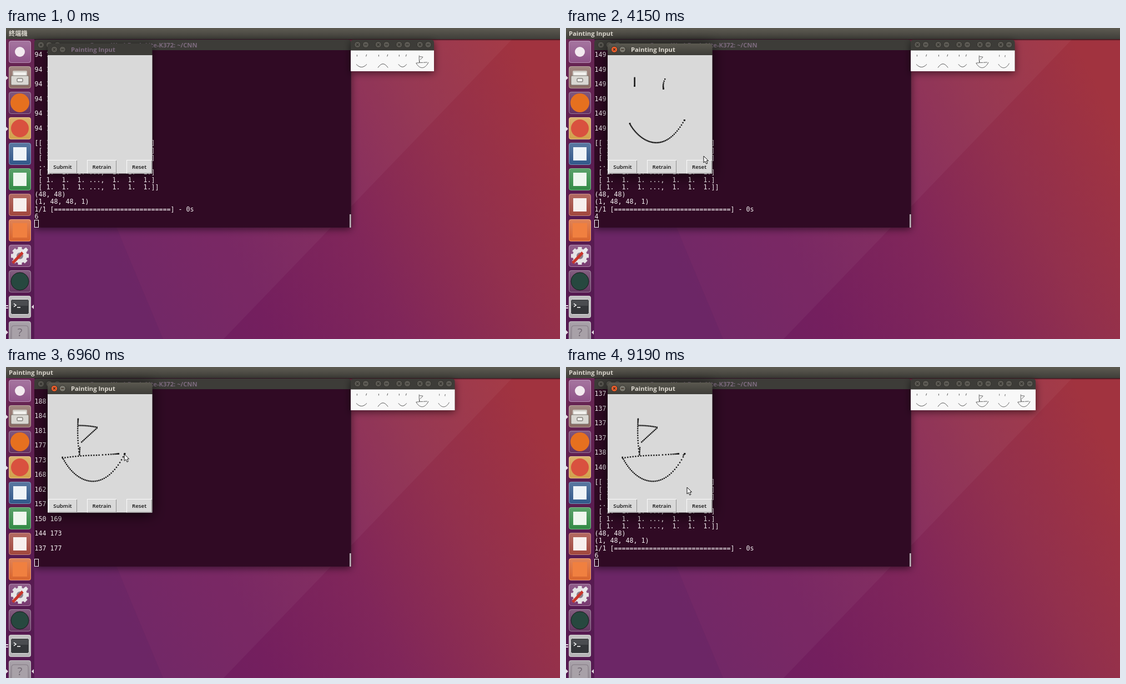
Animation of 998x561 px, one loop 9210 ms. Source, as an HTML page with a canvas:

```html
<!DOCTYPE html>
<html>
<head>
<meta charset="utf-8">
<title>Painting Input</title>
<style>
html, body { margin: 0; width: 100%; height: 100%; overflow: hidden; background: #6c2062; }
canvas { display: block; }
</style>
</head>
<body>
<canvas id="stage" width="998" height="561"></canvas>
<script>
const g = document.getElementById('stage').getContext('2d');
const LOOP = 9210, UNIT = 0.785, PRINT_LAG = 50, CLEAR_AT = 4420;
const UI = '"Open Sans", "Noto Sans", "Noto Sans CJK TC", "Noto Sans CJK", sans-serif';
const TITLE = 'bold 11.2px ' + UI;
const MONO = '11.63px "DejaVu Sans Mono", monospace';
const DIM = '#7d6b7e', LIT = '#dfdbd2';

// ---------- pen strokes: Bezier curves sampled like a mouse ----------
const mix = (a, b, u) => a + (b - a) * u;
function bezier(points, u) {
  while (points.length > 1)
    points = points.slice(1).map((p, i) => [mix(points[i][0], p[0], u), mix(points[i][1], p[1], u)]);
  return points[0];
}
const linear = u => u;
const easeIn = u => u ** 1.5;
const easeOut = u => 1 - (1 - u) ** 2.09;

const strokes = [];
function stroke(drawing, start, gap, n, curve, { ease = linear, hold = 0 } = {}) {
  const samples = [];
  for (let i = 0; i <= n + hold; i++) {
    const [x, y] = bezier(curve, ease(Math.min(1, i / n)));
    samples.push({ t: start + gap * i, x, y });
  }
  strokes.push({ drawing, samples });
}
const SMILE = 0, BOAT = 1;
stroke(SMILE, 890, 12, 10, [[62, 52], [62, 71]], { hold: 2 });
stroke(SMILE, 1300, 10, 9, [[131.5, 55.07], [126, 66.035], [128, 77]], { ease: easeOut, hold: 3 });
stroke(SMILE, 1890, 1, 1, [[51, 157], [51, 157]]);
stroke(SMILE, 1930, 6.5, 44, [[51, 158], [72, 196], [128, 236], [176, 149.5]], { hold: 6 });

stroke(BOAT, 4640, 17, 17, [[70, 57], [67, 100], [73, 139]], { ease: easeIn });
stroke(BOAT, 4960, 17, 4, [[73, 139], [74, 123]]);
stroke(BOAT, 5220, 16, 11, [[72, 72], [93, 72], [113, 76]]);
stroke(BOAT, 5420, 16, 12, [[113, 78], [78, 110]]);
stroke(BOAT, 5802, 18, 13, [[34.2, 146.7], [73.2, 140.87], [112.2, 140.3]]);
stroke(BOAT, 6080, 15, 11, [[118, 140], [163, 137]], { ease: easeOut });
stroke(BOAT, 6420, 12, 40, [[34, 145], [62, 203], [128, 236], [177, 137]], { hold: 3 });
stroke(BOAT, 6950, 12, 1, [[176, 138], [174, 140]]);

// ---------- terminal log ----------
const matrixRow = (head, tail) => head + ' 1.  1.  1. ...,  1.  1.  1.' + tail;
const result = digit => [matrixRow('[[', ']'), matrixRow(' [', ']'), matrixRow(' [', ']'), ' ..., ',
  matrixRow(' [', ']'), matrixRow(' [', ']'), matrixRow(' [', ']]'),
  '(48, 48)', '(1, 48, 48, 1)', '1/1 [' + '='.repeat(30) + '] - 0s', digit];
const log = [];
const print = (t, lines) => lines.forEach(text => log.push({ t, text }));
for (let i = 0; i < 6; i++) print(-1, ['94 176', '']);
print(-1, result('6'));
for (const s of strokes.flatMap(s => s.samples))
  print(s.t + PRINT_LAG, [Math.floor(s.y) + ' ' + Math.floor(s.x), '']);
print(2900, result('4'));
print(7440, result('6'));
log.sort((a, b) => a.t - b.t);

// ---------- pointer: rests at a few places, follows the pen in between ----------
const path = [];
const rest = (from, to, x, y) => path.push({ t: from, x, y }, { t: to, x, y });
rest(3060, 3560, 169, 195);
rest(4150, 4190, 248, 231);
rest(4310, 4430, 240, 247);
rest(7280, 7600, 105, 249);
rest(7880, 8300, 165, 200);
rest(8870, 8910, 190, 181);
rest(9190, LOOP, 218, 217);
for (const s of strokes) if (s.drawing === BOAT)
  for (const p of s.samples) path.push({ t: p.t, x: 75 + p.x * UNIT, y: 49 + p.y * UNIT });
path.sort((a, b) => a.t - b.t);

function pointerAt(t) {
  if (t < path[0].t) return null;
  const i = path.findIndex(p => p.t > t), a = path[i - 1], b = path[i];
  const drawing = b.t - a.t < 20;
  const u = drawing ? 0 : (t - a.t) / (b.t - a.t), s = u * u * (3 - 2 * u);
  return { x: mix(a.x, b.x, s), y: mix(a.y, b.y, s) };
}

const within = (t, a, b) => t >= a && t < b;
function focusAt(t) {
  if (t < 880) return 'terminal';
  if (within(t, 2940, 3340) || within(t, 7480, 8120)) return 'viewer';
  if (within(t, 3340, 3500) || within(t, 8120, 8260)) return 'dialog';
  return 'paint';
}
const panelText = { terminal: '終端機', viewer: 'Canvaloomer: tmptqn3_f75', dialog: 'Iguess...', paint: 'Painting Input' };

// ---------- drawing helpers ----------
function rect(x, y, w, h, fill) { g.fillStyle = fill; g.fillRect(x, y, w, h); }
function round(x, y, w, h, r, fill, line) {
  g.beginPath(); g.roundRect(x, y, w, h, r);
  g.fillStyle = fill; g.fill();
  if (line) { g.strokeStyle = line; g.lineWidth = 1; g.stroke(); }
}
function disc(x, y, r, fill, line) {
  g.beginPath(); g.arc(x, y, r, 0, 7);
  g.fillStyle = fill; g.fill();
  if (line) { g.strokeStyle = line; g.lineWidth = 1; g.stroke(); }
}
function trace(points) { g.beginPath(); points.forEach(p => g.lineTo(...p)); }
function line(points, color, width) { trace(points); g.strokeStyle = color; g.lineWidth = width; g.stroke(); }
function shape(points, color) { trace(points); g.closePath(); g.fillStyle = color; g.fill(); }
function text(str, x, y, color, font, align = 'left') {
  g.font = font; g.fillStyle = color; g.textAlign = align;
  g.fillText(str, x, y);
}
function gradient(x0, y0, x1, y1, ...colors) {
  const grad = g.createLinearGradient(x0, y0, x1, y1);
  colors.forEach((c, i) => grad.addColorStop(i / (colors.length - 1), c));
  return grad;
}
function frameWindow(x, y, w, h, bar, focused) {
  g.save();
  g.shadowColor = `rgba(0,0,0,${focused ? 0.75 : 0.55})`;
  g.shadowBlur = focused ? 24 : 14;
  g.shadowOffsetY = 3;
  round(x, y, w, h, [5, 5, 0, 0], '#3d3c38');
  g.restore();
  if (focused) round(x, y, w, bar, [5, 5, 0, 0], gradient(0, y, 0, y + bar, '#5b5950', '#3d3c37'));
}
function windowButtons(x, y, kinds, focused) {
  kinds.forEach((kind, i) => {
    const close = kind === 'close', cx = x + 14.8 * i;
    const ink = focused ? '#3a2a20' : '#35342f';
    disc(cx, y, 5.6, !focused ? '#5c5a54' : close ? '#ee5f2c' : '#7c7a70', '#33322d');
    if (close) {
      line([[cx - 2, y - 2], [cx + 2, y + 2]], ink, 1.2);
      line([[cx + 2, y - 2], [cx - 2, y + 2]], ink, 1.2);
    } else if (kind === 'min') line([[cx - 2.5, y], [cx + 2.5, y]], ink, 1.3);
    else { g.strokeStyle = ink; g.lineWidth = 1; g.strokeRect(cx - 2, y - 2, 4, 4); }
  });
}

// ---------- desktop ----------
function desktop() {
  rect(0, 0, 998, 561, gradient(250, 561, 998, 180, '#6b1f61', '#741f5e', '#80265a', '#92304d', '#a1333f'));
  shape([[50, 20], [912, 20], [392, 561], [50, 561]], 'rgba(255,255,255,.04)');
  shape([[50, 350], [195, 350], [283, 561], [50, 561]], 'rgba(60,25,90,.1)');
}
function panel(focus) {
  rect(0, 20, 998, 3, gradient(0, 20, 0, 23, 'rgba(20,10,16,.8)', 'rgba(20,10,16,0)'));
  rect(0, 0, 998, 20, gradient(0, 0, 0, 20, '#5d5b52', '#3f3e39'));
  text(panelText[focus], 5, 13.5, LIT, TITLE);
}

const plainDisc = (r, color, edge) => y => disc(25, y, r, color, edge);
const plainSquare = (size, color) => y => rect(25 - size / 2, y - size / 2, size, size, color);
function drawer(y) {
  round(12, y - 12, 26, 11, 2, '#cfccc6');
  rect(14, y - 9, 22, 6, '#f2f1ee');
  round(9, y - 3, 32, 17, 2, '#d9d7d2', '#77706a');
  round(20, y + 2, 10, 6, 1, '#efeeec', '#56524d');
}
function gear(y) {
  for (let i = 0; i < 4; i++) {
    const c = Math.cos(i * Math.PI / 4) * 16, s = Math.sin(i * Math.PI / 4) * 16;
    line([[25 - c, y - s], [25 + c, y + s]], '#e6e4e6', 7);
  }
  disc(25, y, 13, '#e6e4e6');
  disc(25, y, 6, '#8d7f8c');
  line([[12, y + 13], [32, y - 8]], '#c8352b', 5);
  line([[30, y - 6], [38, y - 13]], '#eceaec', 6);
}
function shell(y) {
  round(8.5, y - 13.5, 33, 27, 3, '#34363a', '#e6e6e6');
  rect(10, y - 12, 30, 10, '#4a4c50');
  line([[14, y - 6], [18, y - 3], [14, y]], '#fff', 1.5);
  line([[20, y + 1], [26, y + 1]], '#fff', 1.5);
}
function unknown(y) {
  round(10, y - 12, 30, 30, 4, '#a8a1a8', '#837a84');
  text('?', 25, y + 7, '#716873', '20px ' + UI, 'center');
}
const launchers = [
  ['#8f5388', plainDisc(9, '#f3eaf0')], ['#8b6a62', drawer],
  ['#63305f', plainDisc(17, '#e6701f')], ['#d2a04b', plainDisc(16, '#d9513f')],
  ['#31588a', plainSquare(24, '#eef3f7')], ['#328a45', plainSquare(24, '#eef6ee')],
  ['#a1463c', plainSquare(24, '#f7efed')], ['#d9652d', plainSquare(26, '#f08040')],
  ['#77386f', gear], ['#643660', plainDisc(16, '#27483f', '#161c1c')],
  ['#b4b2b4', shell], ['#958d96', unknown]
];
function arrow(x, y, dir) { shape([[x, y - 4], [x + 4 * dir, y], [x, y + 4]], '#e8dfe6'); }
function launcher(focus) {
  rect(0, 20, 51, 541, gradient(0, 20, 0, 561, '#692653', '#591b50', '#551a52'));
  launchers.forEach(([color, icon], i) => {
    const top = 23 + 46 * i;
    round(5, top, 40, 40, 4, color);
    round(5.5, top + 0.5, 39, 39, 4,
      gradient(0, top, 0, top + 40, 'rgba(255,255,255,.2)', 'rgba(255,255,255,0)'), 'rgba(255,255,255,.35)');
    icon(top + 20);
  });
  [90, 182, 549].forEach(y => arrow(0, y, 1));
  rect(0, 500, 4, 2, '#e8dfe6');
  rect(0, 504, 4, 2, '#e8dfe6');
  if (focus !== 'viewer') arrow(50, focus === 'terminal' ? 503 : 549, -1);
}

function terminal(t) {
  frameWindow(51, 21, 570.5, 339, 19, false);
  windowButtons(63, 30.5, ['close', 'min', 'max'], false);
  text('nora@nora-WorkBook-Lite-K372: ~/CNN', 344.5, 34.5, DIM, TITLE, 'right');
  rect(51, 40, 570.5, 320, '#300a24');
  const rows = log.filter(l => l.t <= t).slice(-23);
  rows.forEach((l, i) => text(l.text, 51.5, 52.3 + 13.25 * i, '#f4f0f2', MONO));
  g.strokeStyle = '#fff'; g.lineWidth = 1;
  g.strokeRect(51.5, 346.5, 7, 13);
  rect(619, 336, 2.5, 24, '#c2bcbf');
}

// ---------- thumbnails ----------
const TILE = 37.5, THUMB = TILE / 241;
const STEPS = Array.from({ length: 9 }, (_, i) => i / 8);
function face(left, right, corner, bend) {
  const mouth = [[left, corner], [(left + right) / 2, bend], [right, corner]];
  return [[[left + 9, 50], [left + 9, 70]], [[right - 2, 46], [right - 9, 70]], STEPS.map(u => bezier(mouth, u))];
}
const sketch = n => strokes.filter(s => s.drawing === n).map(s => s.samples.map(p => [p.x, p.y]));
const thumbs = [face(64, 186, 160, 226), face(74, 190, 200, 112), face(70, 165, 160, 222),
  sketch(BOAT), sketch(SMILE), sketch(BOAT)];
function viewers(t, focus) {
  const count = t < 2940 ? 4 : t < 7480 ? 5 : 6;
  const newest = focus === 'viewer' ? count - 1 : -1;
  const quiet = newest < 0 ? count : newest;
  frameWindow(621, 21, TILE * quiet, 57, 19.5, false);
  if (newest > 0) frameWindow(621 + TILE * newest, 20, TILE, 58, 20.5, true);
  rect(621, 40.5, TILE * count, 37.5, '#f8f8f8');
  thumbs.slice(0, count).forEach((lines, i) => {
    const x = 621 + TILE * i;
    windowButtons(x + 12.2, 30, ['close', 'min'], i === newest);
    for (const points of lines)
      line(points.map(p => [x + p[0] * THUMB, 40.5 + p[1] * THUMB]), '#444', 0.9);
  });
}

// ---------- painting window ----------
function button(label, x, w, hover, pressed) {
  rect(x, 238, w, 24.5, pressed ? '#8a8a8a' : '#fafafa');
  rect(x + 1, 239, w - 1, 23.5, pressed ? '#fafafa' : '#8f8f8f');
  rect(x + 1, 239, w - 2, 22.5, hover ? '#ececec' : '#d9d9d9');
  text(label, x + w / 2, 254, '#111', '600 9.7px ' + UI, 'center');
}
function paintWindow(t, focus, pointer) {
  const lit = focus === 'paint';
  frameWindow(75, 28, 188.5, 234.5, 21, lit);
  windowButtons(87, 38.7, ['close', 'min'], lit);
  text('Painting Input', 117, 43, lit ? LIT : DIM, TITLE);
  rect(75, 49, 188.5, 213.5, '#d9d9d9');
  const over = (x, w) => lit && pointer && within(pointer.y, 238, 262) && within(pointer.x, x, x + w);
  button('Submit', 76, 52, within(t, 2550, 2900) || over(76, 52), within(t, 2700, 2900) || within(t, 7330, 7440));
  button('Retrain', 146, 53, over(146, 53), false);
  button('Reset', 217, 46, over(217, 46), within(t, 4330, CLEAR_AT));
  const current = t < CLEAR_AT ? SMILE : BOAT;
  for (const s of strokes) if (s.drawing === current)
    for (const p of s.samples) if (p.t <= t)
      rect(75 + p.x * UNIT - 1.2, 49 + p.y * UNIT - 1.2, 2.4, 2.4, '#1c1c1c');
}

function dialog(t, focus) {
  const first = within(t, 3020, 3500);
  if (!first && !within(t, 7600, 8260)) return;
  const x = first ? 115 : 117, w = first ? 108 : 104, lit = focus === 'dialog';
  frameWindow(x, 119, w, 95, 21, lit);
  windowButtons(x + 12, 130, ['close', 'max'], lit);
  text('Iguess...', x + 43, 134, lit ? LIT : '#806f83', TITLE);
  rect(x, 140, w, 74.5, '#d9d9d9');
  const bulb = x + 20;
  disc(bulb, 156, 7.5, gradient(bulb - 7, 149, bulb + 7, 163, '#eef7ff', '#8fbfe6'), '#6f9cc4');
  rect(bulb - 3, 163, 6, 6, '#c9a95a');
  rect(bulb - 2, 169, 4, 2, '#4a4a4a');
  text(first ? "It's smile?" : "It's boat?", x + 46.5, 160, '#111', 'bold 10.9px ' + UI);
  const ok = first ? 140 : 139;
  rect(ok, 185, 58, 23.5, '#8f8f8f');
  rect(ok, 185, 57, 22.5, '#f8f8f8');
  text('OK', ok + 28.5, 200.5, '#111', '600 9.7px ' + UI, 'center');
  rect(ok + 22, 202, 7, 1, '#111');
}

function arrowPointer({ x, y }) {
  g.save();
  g.translate(x, y);
  shape([[0, 0], [0, 12], [2.8, 9.4], [4.8, 14], [7, 13], [5, 8.7], [8.6, 8.5]], '#fff');
  g.strokeStyle = '#111'; g.lineWidth = 1; g.stroke();
  g.restore();
}

function frame() {
  const t = performance.now() % LOOP;
  const focus = focusAt(t), pointer = pointerAt(t);
  desktop();
  panel(focus);
  terminal(t);
  viewers(t, focus);
  paintWindow(t, focus, pointer);
  dialog(t, focus);
  launcher(focus);
  if (pointer) arrowPointer(pointer);
  requestAnimationFrame(frame);
}
frame();
</script>
</body>
</html>
```
